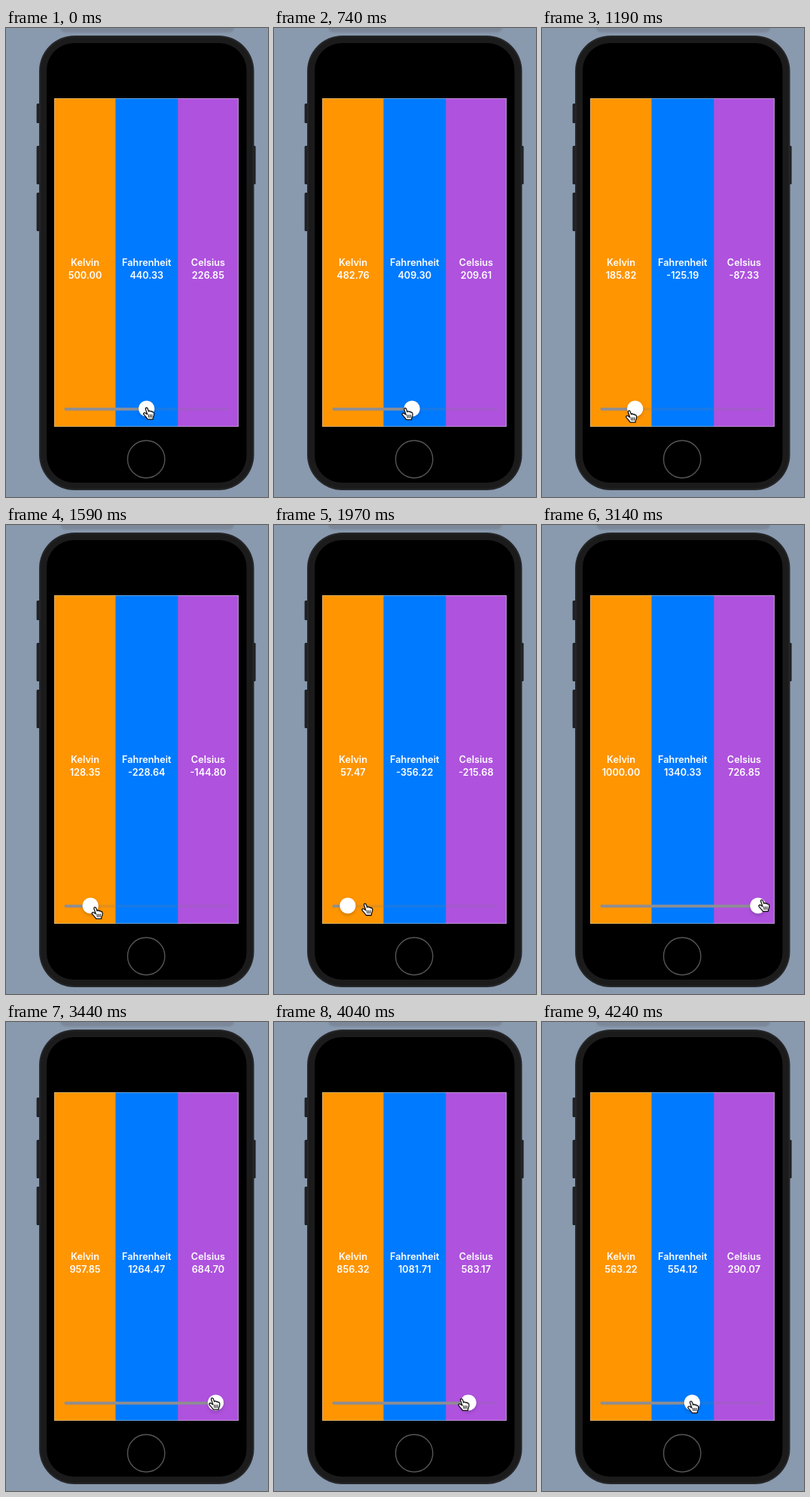
These frames come from a looping animation (348 by 621 pixels, 4.94 s). An HTML page:

```html
<!DOCTYPE html>
<html lang="en">
<head>
<meta charset="utf-8">
<title>Temperature slider</title>
<style>
  html, body { margin: 0; width: 100%; height: 100%; overflow: hidden; background: #8999ae; }
  svg { display: block; width: 348px; height: 621px; }
  text { font: 600 12.7px Inter, "Open Sans", sans-serif; fill: #fff; text-anchor: middle; }
</style>
</head>
<body>
<svg viewBox="0 0 348 621">
  <defs>
    <filter id="soft" x="-60%" y="-60%" width="220%" height="220%"><feGaussianBlur stdDeviation="2.6"/></filter>
    <filter id="blur"><feGaussianBlur stdDeviation="1"/></filter>
    <rect id="button" width="6" height="51" rx="1.5" fill="#202124"/>
  </defs>

  <rect width="348" height="621" fill="#8999ae"/>
  <rect x="72" y="-12" width="231" height="18" rx="7" fill="#7b8899" filter="url(#blur)"/>

  <use href="#button" x="40.6" y="156"/>
  <use href="#button" x="40.6" y="218"/>
  <use href="#button" x="325.6" y="156"/>
  <rect x="40.6" y="100" width="6" height="26" rx="1.5" fill="#202124"/>
  <rect x="44" y="10" width="285.5" height="602" rx="47" fill="#252628"/>
  <rect x="46" y="12" width="281.5" height="598" rx="45" fill="#1b1b1c"/>
  <rect x="54" y="20" width="265.5" height="582" rx="36"/>
  <circle cx="186.2" cy="571" r="24.7" fill="none" stroke="#555" stroke-width="1.4"/>

  <rect x="64" y="93" width="245" height="435" fill="#ff9500"/>
  <rect x="145.5" y="93" width="163.5" height="435" fill="#007aff"/>
  <rect x="228.3" y="93" width="80.7" height="435" fill="#af52de"/>
  <rect x="64.5" y="93.5" width="244" height="434" fill="none" stroke="#ccc" stroke-opacity=".5"/>

  <text x="105" y="314.7">Kelvin</text>
  <text x="186.8" y="314.7">Fahrenheit</text>
  <text x="268.4" y="314.7">Celsius</text>
  <text x="105" y="331.7" id="kelvin"></text>
  <text x="186.8" y="331.7" id="fahrenheit"></text>
  <text x="268.4" y="331.7" id="celsius"></text>

  <rect x="77.5" y="502.8" width="219" height="3.6" rx="1.8" fill="#787880" fill-opacity=".2"/>
  <rect x="77.5" y="502.8" height="3.6" rx="1.8" fill="#8e8e93" id="fill"/>
  <g id="knob">
    <circle cy="2.5" r="10" fill-opacity=".22" filter="url(#soft)"/>
    <circle r="10.6" fill="#fff"/>
  </g>
  <g id="cursor" stroke="#111" stroke-linejoin="round" stroke-linecap="round">
    <path d="M-2 1.8L-4.2 -4.6C-5 -7 -2.4 -7.9 -1.5 -5.7L-.2 -2C.2 -3.3 2 -3.1 2.4 -1.8C3 -2.7 4.4 -2.3 4.7 -1.1C5.5 -1.7 6.7 -1.1 6.8 .2C7.1 2.6 6.7 4.2 5.8 5.6L5.4 8.4H-1.6C-2.2 6.6 -5 4.5 -6.7 2C-7.8 .3 -5.8 -.9 -4.3 .2Z" fill="#fff" stroke-width="1.3"/>
    <path d="M-.3 2.2L0 5.8M1.9 2.2V5.8M4.1 2.2L3.9 5.8" fill="none"/>
  </g>
</svg>
<script>
const LOOP = 4940;
const NOTCHES = 522;
const CADENCE = 48;

// The slider moves in short bursts; lead is how far the hand is ahead of the knob.
const BURSTS = [
  { start: 490, end: 590, notch: 263, lead: -6 },
  { start: 740, end: 820, notch: 230, lead: -6 },
  { start: 1040, end: 1190, notch: 97, lead: -5 },
  { start: 1390, end: 1890, notch: 30, lead: 26 },
  { start: 2340, end: 2390, notch: 300, lead: 4 },
  { start: 3140, end: 3140, notch: 522, lead: 8 },
  { start: 3340, end: 3510, notch: 485, lead: -8 },
  { start: 4040, end: 4240, notch: 294, lead: 1.5 }
];

const el = id => document.getElementById(id);
const place = (id, x, y) => el(id).setAttribute("transform", `translate(${x} ${y})`);
const lerp = (a, b, p) => a + (b - a) * p;

// Fraction of a burst done, counted in whole screen updates.
function progress({ start, end }, time) {
  const gaps = Math.round((end - start) / CADENCE);
  const passed = time < end ? Math.floor((time - start) / (end - start) * gaps) : gaps;
  return (passed + 1) / (gaps + 1);
}

function poseAt(time) {
  let notch = NOTCHES / 2, lead = 3;
  for (const burst of BURSTS) {
    if (time < burst.start) break;
    const p = progress(burst, time);
    notch = lerp(notch, burst.notch, p);
    lead = lerp(lead, burst.lead, p);
  }
  return { kelvin: Math.round(notch) / NOTCHES * 1000, lead };
}

function render(time) {
  const { kelvin, lead } = poseAt(time);
  const knobX = lerp(86.4, 287, kelvin / 1000);
  const handX = knobX + lead;
  // The hand travels on a slight slope and lifts as it strays from the knob.
  const handY = 520.6 - handX * 0.057 - lead * lead / 130;

  el("kelvin").textContent = kelvin.toFixed(2);
  el("fahrenheit").textContent = (kelvin * 1.8 - 459.67).toFixed(2);
  el("celsius").textContent = (kelvin - 273.15).toFixed(2);
  el("fill").setAttribute("width", knobX - 77.5);
  place("knob", knobX, 504);
  place("cursor", handX, handY);
}

function tick(now) {
  render(now % LOOP);
  requestAnimationFrame(tick);
}
render(0);
requestAnimationFrame(tick);
</script>
</body>
</html>
```
